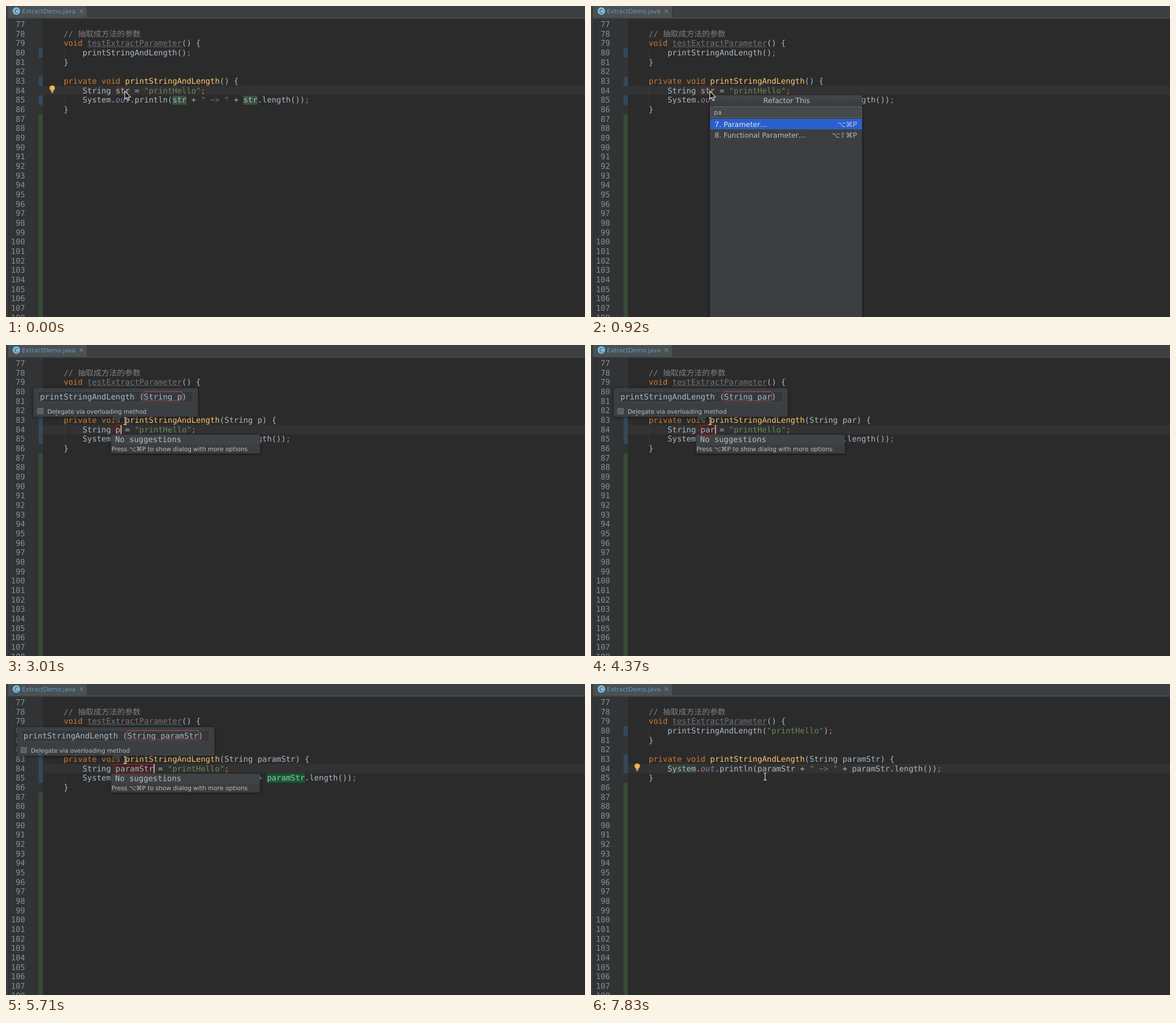
Write an HTML page with a canvas that moves like this. It is 1021 px wide and 548 px high and loops after 8000 ms.

```html
<!DOCTYPE html>
<html lang="en">
<head>
<meta charset="utf-8">
<title>Extract parameter</title>
<style>
html, body { margin: 0; width: 100%; height: 100%; overflow: hidden; background: #2b2b2b; }
canvas { display: block; }
</style>
</head>
<body>
<canvas id="stage" width="1021" height="548"></canvas>
<script>
const ctx = document.getElementById('stage').getContext('2d');
ctx.textRendering = 'geometricPrecision';

const LOOP = 8000;
const EM = 13.85, CHAR = EM * 0.602, LEFT = 68.3;
const ROW = 16.667, FIRST = 77;
const MONO = `${EM}px "DejaVu Sans Mono", "Noto Sans CJK SC", "Noto Sans CJK", monospace`;
const ui = size => `${size}px "DejaVu Sans", sans-serif`;
const colors = {
  t: '#a9b7c6', k: '#cc7832', s: '#6a8759', c: '#808080',
  m: '#ffc66d', f: '#9876aa', u: '#72737a'
};

const names = [[0, 'str'], [3010, 'p'], [3180, 'pa'], [3330, 'par'], [4670, 'para'],
  [4820, 'param'], [5270, 'paramS'], [5570, 'paramSt'], [5710, 'paramStr']];
const caretOn = [[0, false], [1820, true], [2860, false], [3010, true],
  [3780, false], [4370, true], [7830, false]];
const panelAlpha = [[0, 0], [1970, 0.55], [2110, 1], [6010, 0.8], [6180, 0.22], [6390, 0]];
const pointer = [[0, [arrow, 209.5, 150]], [2860, [beam, 210, 143]], [3010, [beam, 210, 134]],
  [7530, [beam, 225, 138]], [7680, [beam, 265, 153]], [7830, [beam, 307, 163]]];
const query = [[0, ''], [780, 'p'], [920, 'pa']];

const allActions = [
  ['1. Rename…', '⇧F6'], ['2. Change Signature…', '⌘F6'], ['3. Type Migration…', '⇧⌘F6'],
  ['Extract'],
  ['4. Variable…', '⌥⌘V'], ['5. Constant…', '⌥⌘C'], ['6. Field…', '⌥⌘F'],
  ['7. Parameter…', '⌥⌘P'], ['8. Functional Parameter…', '⌥⇧⌘P'],
  ['9. Method…', '⌥⌘M'], ['Method Object…', ''], ['Delegate…', ''],
  ['Interface…', ''], ['Superclass…', ''],
  ['Inline'], ['Inline…', '⌥⌘N'],
  ['Members'], ['Pull Members Up…', ''], ['Push Members Down…', '']
];
const matchingActions = allActions.slice(7, 9);

const at = (t, steps) => steps.reduce((value, [from, next]) => t >= from ? next : value, steps[0][1]);
const colX = col => LEFT + col * CHAR;
const baseline = line => 37 + (line - FIRST) * ROW;
const rowTop = line => baseline(line) - 12.7;

function rect(x, y, w, h, fill) {
  ctx.fillStyle = fill;
  ctx.fillRect(x, y, w, h);
}

function frame(x, y, w, h, stroke, radius = 0) {
  ctx.strokeStyle = stroke;
  ctx.lineWidth = 1;
  ctx.beginPath();
  ctx.roundRect(x, y, w, h, radius);
  ctx.stroke();
}

// An invisible skew keeps baselines from snapping to whole pixels.
function label(s, x, y, color, font = MONO, align = 'left') {
  ctx.save();
  ctx.transform(1, 1e-5, 0, 1, 0, 0);
  ctx.font = font;
  ctx.fillStyle = color;
  ctx.textAlign = align;
  ctx.fillText(s, x, y);
  ctx.restore();
}

function withShadow(draw) {
  ctx.save();
  ctx.shadowColor = 'rgba(0,0,0,0.5)';
  ctx.shadowBlur = 6;
  ctx.shadowOffsetY = 1;
  draw();
  ctx.restore();
}

// Segments are [style, text]; each one starts on the character grid.
function code(line, col, ...segments) {
  for (const [style, s] of segments) {
    label(s, colX(col), baseline(line), colors[style], (style === 'f' ? 'italic ' : '') + MONO);
    col += s.length;
  }
}

function mark(line, col, length, fill) {
  rect(colX(col), Math.round(rowTop(line)), length * CHAR, 16, fill);
}

function tabBar() {
  rect(0, 0, 1021, 22, '#3c3f41');
  rect(4, 0, 140, 20, '#4b5052');
  rect(143, 0, 1, 20, '#323435');
  rect(4, 20, 1017, 2, '#45494b');
  rect(4, 22, 1017, 1, '#353738');
  ctx.fillStyle = '#80bde0';
  ctx.beginPath();
  ctx.arc(18.3, 8.8, 6.6, 0, 7);
  ctx.fill();
  label('C', 18.3, 12.5, '#2d4654', ui(10), 'center');
  label('ExtractDemo.java', 28, 13, '#6299c4', ui(10.6));
  ctx.strokeStyle = '#7d8082';
  ctx.lineWidth = 1.1;
  ctx.beginPath();
  ctx.moveTo(130, 6); ctx.lineTo(136, 12);
  ctx.moveTo(136, 6); ctx.lineTo(130, 12);
  ctx.stroke();
}

function gutter(blueLines, greenFrom) {
  rect(0, 0, 3, 548, '#3c3f41');
  rect(3, 0, 1, 548, '#2b2b2b');
  rect(4, 22, 61, 526, '#313335');
  for (const line of blueLines) rect(57.4, rowTop(line), 7.6, ROW, '#34485a');
  rect(57.4, rowTop(greenFrom), 7.6, 548, '#374b37');
  for (let line = FIRST; line <= 108; line++) {
    label(String(line), 33.7, baseline(line), '#8b8e90', MONO, 'right');
  }
}

function guide(line, count) {
  rect(102, rowTop(line), 1, count * ROW, '#393939');
}

function wave(x0, x1, y) {
  ctx.strokeStyle = '#77787c';
  ctx.lineWidth = 0.9;
  ctx.beginPath();
  for (let x = x0; x <= x1; x++) ctx.lineTo(x, y + Math.sin(x * Math.PI / 2));
  ctx.stroke();
}

function source(t, name) {
  const template = t >= 1970 && t < 6010;
  const done = t >= 6180;
  const inserted = t >= 6010;
  const parameter = t >= 1970 ? 'String ' + name : '';
  const printLine = done ? 84 : 85;
  const second = 27 + name.length + 12;

  rect(65, 141, 956, 16, '#323232');
  guide(80, 1);
  guide(84, done ? 1 : 2);

  code(78, 4, ['c', '// 抽取成方法的参数']);
  code(79, 4, ['k', 'void '], ['u', 'testExtractParameter'], ['t', '() {']);
  wave(144, 310, 71.8);
  code(80, 8, ['t', 'printStringAndLength('], ['s', inserted ? '"printHello"' : ''], ['t', ')'], ['k', ';']);
  code(81, 4, ['t', '}']);
  code(83, 4, ['k', 'private void '], ['m', 'printStringAndLength'], ['t', `(${parameter}) {`]);

  if (!done) {
    if (t < 1970) mark(84, 15, 3, '#40332b');
    if (template) {
      mark(84, 15, name.length, '#3c2727');
      frame(colX(15) + 0.3, 141.5, name.length * CHAR, 15, '#d41414');
    }
    code(84, 8, ['t', `String ${name} = `], ['s', '"printHello"'], ['k', ';']);
  }
  if (t < 6010) {
    const fill = template ? '#125a2c' : '#3a5140';
    mark(85, 27, name.length, fill);
    mark(85, second, name.length, fill);
  }
  if (t >= 6930) mark(84, 8, 6, '#344134');
  code(printLine, 8, ['t', 'System.'], ['f', 'out'], ['t', `.println(${name} + `],
    ['s', '" −> "'], ['t', ` + ${name}.length())`], ['k', ';']);
  code(printLine + 1, 4, ['t', '}']);

  if (at(t, caretOn)) {
    const col = done ? 8 : t < 1970 ? 17 : 15 + name.length;
    rect(colX(col) + 0.4, 141, 1.5, 16, '#d0d0d0');
  }
}

function bulb() {
  ctx.fillStyle = '#f0b54a';
  ctx.beginPath();
  ctx.arc(81.5, 144.7, 4.8, 0, 7);
  ctx.fill();
  rect(79.2, 147, 4.6, 2.6, '#f0b54a');
  rect(79.2, 150, 4.6, 1.3, '#b9bcbd');
  rect(79.7, 152, 3.6, 1.5, '#9da0a1');
}

function refactorMenu(search) {
  withShadow(() => rect(210, 157.5, 268, 400, '#3c3f41'));
  const shade = ctx.createLinearGradient(0, 157, 0, 176);
  shade.addColorStop(0, '#444749');
  shade.addColorStop(1, '#393c3e');
  rect(210, 157.5, 268, 19, shade);
  label('Refactor This', 345, 171.3, '#bcbebf', ui(12.55), 'center');

  let y = 177;
  if (search) {
    rect(210, 177, 268, 20, '#45494a');
    frame(210.5, 177.5, 267, 19, '#5c6062');
    label(search, 216.8, 190.5, '#bbbbbb', ui(10.8));
    y = 198.7;
  }
  let first = true;
  for (const [title, keys] of search ? matchingActions : allActions) {
    if (keys === undefined) {
      rect(212, y + 10, 264, 1, '#515456');
      rect(314, y + 5, 62, 10, '#3c3f41');
      label(title, 345, y + 14, '#8c8f91', ui(10.5), 'center');
    } else {
      if (first) rect(210, y, 268, 18.6, '#2b60cc');
      label(title, 218, y + 14.2, first ? '#e0e5ee' : '#bbbbbb', ui(12.4));
      label(keys, 469, y + 14.2, first ? '#b4c4e6' : '#b0b2b3', ui(12.4), 'right');
    }
    first = false;
    y += 19.5;
  }
}

function suggestions(items) {
  const rows = items.length || 1;
  const hintTop = 158 + rows * 17;
  withShadow(() => rect(185.5, 158, 262, rows * 17 + 16, '#404345'));
  if (items.length) {
    rect(185.5, 158, 262, 17, '#113a5c');
    items.forEach((item, i) => label(item, 192.6, 171.2 + i * 17, '#bbbbbb'));
  } else {
    label('No suggestions', 192.4, 171.2, '#b8bbbd');
  }
  rect(185.5, hintTop, 262, 16, '#3b3e40');
  label('Press ⌥⌘P to show dialog with more options', 186, hintTop + 11.9, '#bbbbbb', ui(10.6));
}

function signaturePanel(name, alpha) {
  const width = 290 + (name.length - 1) * CHAR;
  const x = 193.4 - width / 2;
  const textX = x + 11.6;
  ctx.save();
  ctx.globalAlpha = alpha;
  withShadow(() => {
    ctx.fillStyle = '#3c3f41';
    ctx.beginPath();
    ctx.roundRect(x, 76, width, 50.5, 3);
    ctx.moveTo(187, 126);
    ctx.lineTo(205, 126);
    ctx.lineTo(196, 137);
    ctx.fill();
  });
  rect(x + 8.5, 81, width - 17, 20, '#35383a');
  frame(x + 8.5, 81.5, width - 17, 19.5, '#484b4d');
  label(`printStringAndLength (String ${name})`, textX, 95.6, colors.t);
  frame(textX + 22 * CHAR - 0.5, 82.5, (7 + name.length) * CHAR + 1, 15.5, '#b5484b', 2);
  rect(x + 6.5, 111, 11, 11, '#5d6062');
  frame(x + 7, 111.5, 10, 10, '#6b6e70', 1);
  label('Delegate via overloading method', x + 24.5, 121.2, '#bbbbbb', ui(10.45));
  rect(x + 39.1, 123, 3, 0.9, '#bbbbbb');
  ctx.restore();
}

function arrow(x, y) {
  ctx.beginPath();
  for (const [dx, dy] of [[0, 0], [0, 14], [3.2, 11.2], [5.7, 16.5], [8, 15.4], [5.6, 10.4], [10, 10.2]]) {
    ctx.lineTo(x + dx, y + dy);
  }
  ctx.closePath();
  ctx.fillStyle = '#111111';
  ctx.fill();
  ctx.strokeStyle = '#eeeeee';
  ctx.lineWidth = 1.1;
  ctx.stroke();
}

function beam(x, y) {
  for (const [color, width] of [['#161616', 2.6], ['#e4e4e4', 1.2]]) {
    ctx.strokeStyle = color;
    ctx.lineWidth = width;
    ctx.beginPath();
    for (const side of [-2.8, 2.8]) {
      ctx.moveTo(x + side, y - 6.5);
      ctx.quadraticCurveTo(x, y - 6.5, x, y - 4.5);
      ctx.lineTo(x, y + 4.5);
      ctx.quadraticCurveTo(x, y + 6.5, x + side, y + 6.5);
    }
    ctx.stroke();
  }
}

function draw(t) {
  const name = at(t, names);
  const done = t >= 6180;
  rect(0, 0, 1021, 548, '#2b2b2b');
  gutter(done ? [80, 83, 84] : t < 1970 ? [80, 83, 85] : [80, 83, 84, 85], done ? 86 : 87);
  tabBar();
  source(t, name);
  if (t < 150 || t >= 7530) bulb();
  if (t >= 150 && t < 1820) refactorMenu(at(t, query));
  if (t >= 1970 && t < 6010) suggestions(t < 3010 ? ['str', 's'] : []);
  const alpha = at(t, panelAlpha);
  if (alpha) signaturePanel(name, alpha);
  const [shape, x, y] = at(t, pointer);
  shape(x, y);
}

const start = performance.now();
function tick() {
  draw((performance.now() - start) % LOOP);
  requestAnimationFrame(tick);
}
tick();
</script>
</body>
</html>
```
